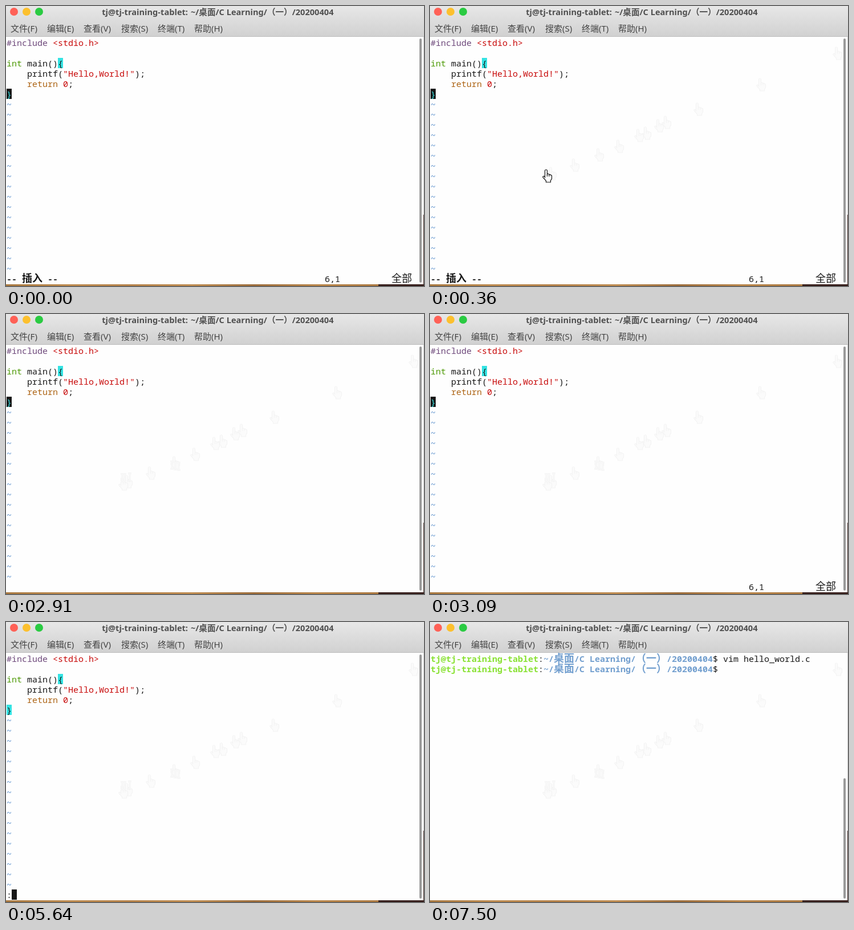
Animation of 733 by 491 pixels, one loop 8000 ms. Source, as an HTML page with a canvas:

```html
<!DOCTYPE html>
<html lang="zh-CN">
<head>
<meta charset="utf-8">
<title>Terminal</title>
<style>
html, body { margin: 0; width: 100%; height: 100%; overflow: hidden; background: #fefefe; }
canvas { display: block; }
</style>
</head>
<body>
<canvas id="stage" width="733" height="491"></canvas>
<script>
const ctx = document.getElementById('stage').getContext('2d');
const LOOP = 8000, CELL = 9, ROW = 18, LEFT = 1, TOP = 55;
const INK = '#171717', PAPER = '#fefefe', CYAN = '#34e2e2', RED = '#c80a0a';
const SANS = '"Noto Sans", "Noto Sans CJK SC", sans-serif';
const MONO = '"Noto Sans Mono", monospace';
const CJK = '"Noto Sans CJK SC", sans-serif';
const USER = 'tj@tj-training-tablet';
const FOLDER = '~/桌面/C Learning/（一）/20200404';
const HAND = new Path2D('M5.5 14.5V3a2 2 0 0 1 4 0v6a1.8 1.8 0 0 1 3.3.8a1.7 1.7 0 0 1 2.8.8a1.4 1.4 0 0 1 1.9 1.4V17L15.5 20V23H7.5V20.5L2 14.5a1.6 1.6 0 0 1 2.2-2Z');
const BEAM = new Path2D('M1 1.5H3.2L4 2.3L4.8 1.5H7M4 2V14M1 14.5H3.2L4 13.7L4.8 14.5H7');

// Pointer stops: the hand moves every 30 ms, then turns into a text beam.
const handStops = [[714, 83], [580, 138], [470, 181], [414, 204], [401, 210], [379, 223],
  [366, 227], [331, 246], [296, 261], [253, 279], [213, 294], [205, 298]];
const beamStops = [[204, 287], [208, 287], [217, 286], [291, 265], [297, 266], [303, 267], [313, 266]];
const pointer = [
  ...handStops.map(([x, y], i) => ({ at: 30 * (i + 1), x, y, draw: drawHand })),
  ...beamStops.map(([x, y], i) => ({ at: i ? 1230 + 30 * i : 1110, x, y, draw: drawBeam })),
];

function box(x, y, w, h, color) {
  ctx.fillStyle = color;
  ctx.fillRect(x, y, w, h);
}

function label(text, x, y, font, color, align = 'left') {
  ctx.font = font;
  ctx.fillStyle = color;
  ctx.textAlign = align;
  ctx.fillText(text, x, y);
}

// Writes on the character grid and returns the next free column.
function type(col, row, text, color = INK, weight = '') {
  for (const ch of text) {
    const wide = ch > '\u2e80';
    label(ch, LEFT + col * CELL, TOP + row * ROW + 15, weight + (wide ? ' 18px ' + CJK : ' 15px ' + MONO), color);
    col += wide ? 2 : 1;
  }
  return col;
}

function typeParts(col, row, ...parts) {
  for (const part of parts) col = type(col, row, ...part);
}

function block(col, row, color) {
  box(LEFT + col * CELL, TOP + row * ROW, CELL, ROW, color);
}

function drawHand(x, y, line, fill) {
  ctx.save();
  ctx.translate(x - 9, y - 12);
  ctx.fillStyle = fill;
  ctx.fill(HAND);
  ctx.strokeStyle = line;
  ctx.lineWidth = 1.2;
  ctx.stroke(HAND);
  ctx.beginPath();
  for (const fx of [9.5, 12.8]) { ctx.moveTo(fx, 9); ctx.lineTo(fx, 13); }
  ctx.stroke();
  ctx.restore();
}

function drawBeam(x, y, line, fill) {
  ctx.save();
  ctx.translate(x - 4, y - 8);
  for (const [color, width] of [[line, 3], [fill, 1]]) {
    ctx.strokeStyle = color;
    ctx.lineWidth = width;
    ctx.stroke(BEAM);
  }
  ctx.restore();
}

function drawWindow() {
  box(0, 0, 733, 491, PAPER);
  const bar = ctx.createLinearGradient(0, 0, 0, 53);
  bar.addColorStop(0, '#e7e7e7');
  bar.addColorStop(1, '#d1d1d1');
  box(0, 0, 733, 53, bar);
  box(0, 53, 733, 1, '#bcbcbc');
  ['#ff6157', '#fcc02e', '#2acb42'].forEach((color, i) => {
    ctx.fillStyle = color;
    ctx.beginPath();
    ctx.arc(14 + 22 * i, 10, 7, 0, 7);
    ctx.fill();
  });
  const titleFont = 'bold 14.6px ' + SANS;
  label(USER + ':', 319, 16, titleFont, '#505050', 'right');
  label(FOLDER, 324, 16, titleFont, '#505050');
  [['文件(F)', 8], ['编辑(E)', 72], ['查看(V)', 136], ['搜索(S)', 202], ['终端(T)', 266], ['帮助(H)', 330]]
    .forEach(([text, x]) => label(text, x, 45, '15px ' + SANS, '#454545'));
  // Desktop showing at the right and bottom edges
  box(732, 54, 1, 312, '#c8c8c8');
  box(732, 366, 1, 125, '#3a211c');
  const wood = ctx.createLinearGradient(0, 0, 653, 0);
  ['#a8783f', '#bd8a4e', '#b58148', '#bf8c50', '#9c6c3a', '#b98549', '#ab783f']
    .forEach((color, i) => wood.addColorStop(i / 6, color));
  box(0, 488, 653, 3, wood);
  box(653, 488, 80, 3, '#38201d');
}

function drawScrollbar(top) {
  ctx.fillStyle = '#999';
  ctx.beginPath();
  ctx.roundRect(725, top, 4, 485 - top, 2);
  ctx.fill();
}

function drawPointer(t) {
  const passed = pointer.filter(p => p.at <= t);
  const current = t < 2910 ? passed.pop() : null;
  const trail = t < 2910 ? passed : passed.slice(0, -1);
  for (const p of trail) p.draw(p.x, p.y, '#f4f4f4', '#fbfbfb');
  if (current) current.draw(current.x, current.y, '#111', '#fff');
}

function drawEditor(t) {
  typeParts(0, 0, ['#include ', '#6f4a7c'], ['<stdio.h>', RED]);
  block(10, 2, CYAN);
  typeParts(0, 2, ['int', '#4e9a06'], [' main(){']);
  typeParts(4, 3, ['printf('], ['"Hello,World!"', RED], [');']);
  typeParts(4, 4, ['return', '#ad6414'], [' '], ['0', RED], [';']);
  const onBrace = t < 3630 || (t >= 4140 && t < 4530);
  block(0, 5, onBrace ? INK : CYAN);
  type(0, 5, '}', onBrace ? CYAN : INK);
  for (let row = 6; row < 23; row++) type(0, row, '~', '#5b90cc');

  if (t < 2910) type(0, 23, '-- 插入 --', INK, 'bold');
  if (t < 2910 || (t >= 3090 && t < 4530)) {
    type(62, 23, '6,1');
    type(75, 23, '全部');
  }
  if (t >= 4530) {
    const command = t < 5670 ? ':' : t < 5940 ? ':w' : ':wq';
    const end = type(0, 23, command);
    if (t < 5070 || (t >= 5640 && t < 6510)) block(end, 23, INK);
  }
}

function drawShell(t) {
  const prompt = [[USER, '#8ae234', 'bold'], [':'], [FOLDER, '#729fcf', 'bold'], ['$ ']];
  typeParts(0, 0, ...prompt, ['vim hello_world.c']);
  typeParts(0, 1, ...prompt);
  if (t < 7500) block(57, 1, INK);
}

function frame() {
  const t = performance.now() % LOOP;
  const editing = t < 6930;
  drawWindow();
  drawScrollbar(editing ? 57 : 274);
  (editing ? drawEditor : drawShell)(t);
  drawPointer(t);
  requestAnimationFrame(frame);
}
frame();
</script>
</body>
</html>
```
